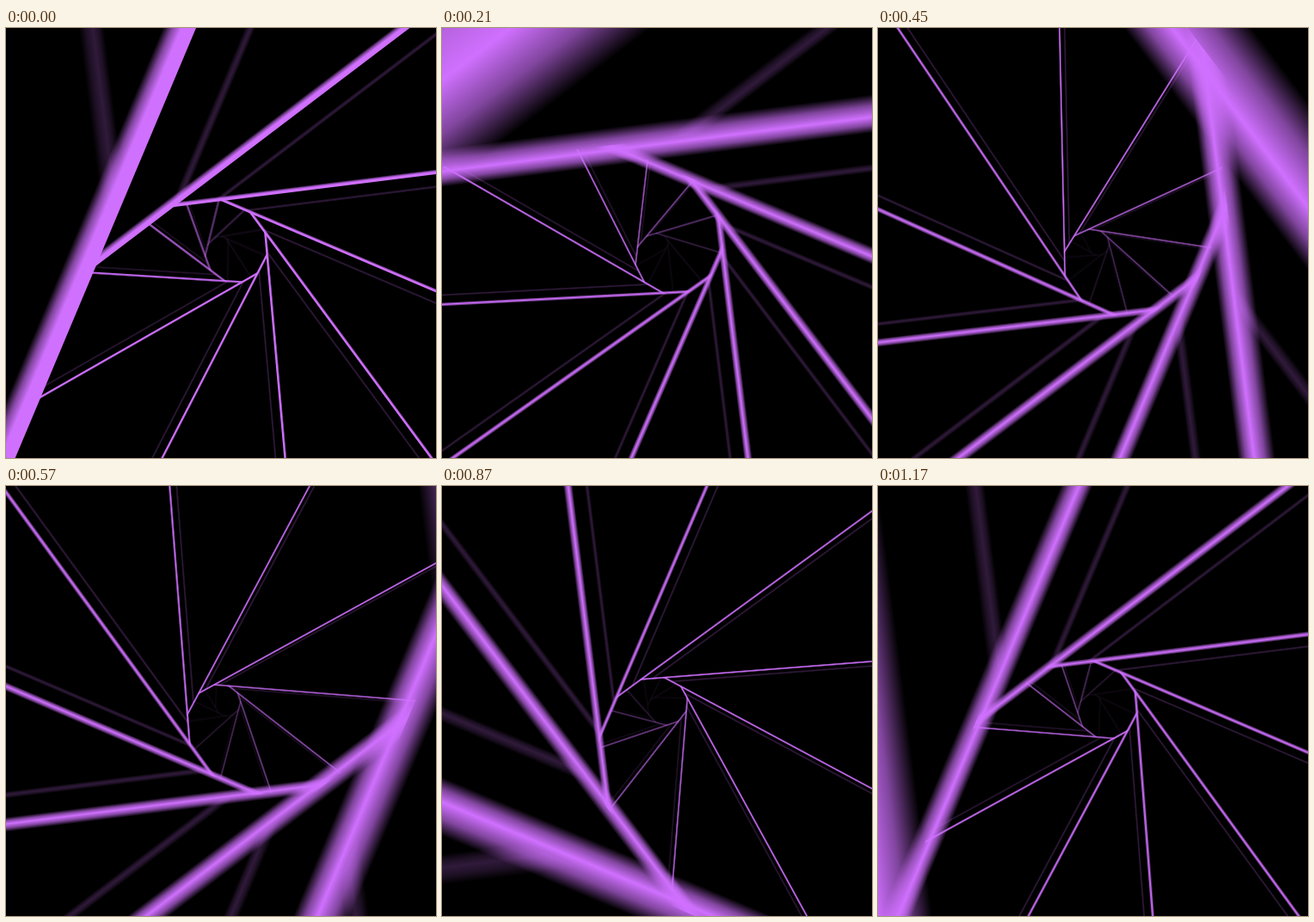
Animation of 500x500 px, one loop 1200 ms. Source, as an HTML page with a canvas:

```html
<!DOCTYPE html>
<html lang="en">
<head>
<meta charset="utf-8">
<title>Spiral tunnel</title>
<style>
  html, body { margin: 0; width: 100%; height: 100%; overflow: hidden; background: #000; }
  canvas { display: block; width: 500px; height: 500px; }
</style>
</head>
<body>
<canvas id="stage" width="500" height="500"></canvas>
<script>
const ctx = document.getElementById('stage').getContext('2d');
const LOOP = 1200, TICK = 30, TURN = 12;
const RAD = Math.PI / 180;
const NEAR = 1.65;      // distance of the camera from the slab at phase 0
const FAR = 17;         // slabs drawn ahead of the camera
const FRONT = 0.23;     // depth of an edge towards the camera
const TRAIL = 0.38;     // depth of an edge away from it, smeared by motion
const SHARP = 0.18;     // the same before any smear
const REACH = 1000;

// Extra rotation of distant slabs, in degrees
const twist = u => 2.72 * Math.log(1 + Math.exp((u - 4.85) / 0.8));

// The camera flies off axis, so each wall has its own distance
function wall(k, u) {
  const turn = twist(u);
  const side = k + turn / 30;
  const shrink = 1 - 0.068 * Math.max(0, u - 7.5);
  return {
    angle: (67.2 - 30 * k - turn) * RAD,
    radius: (316 + 134 * Math.cos((side - 7.6) * 30 * RAD)) * shrink
  };
}

function face(angle) {
  ctx.setTransform(1, 0, 0, 1, 250, 250);
  ctx.rotate(-angle);
}

function strip(radius, z, alpha, crisp) {
  const back = crisp ? SHARP : TRAIL;
  const mid = radius / (z + (back - FRONT) / 2);
  const inner = Math.min(radius / (z + back), mid - 1.5);
  const outer = Math.max(radius / (z - FRONT), mid + 1.5);
  const core = (mid - inner) / (outer - inner);
  const glow = ctx.createLinearGradient(0, -inner, 0, -outer);
  const stop = (at, a) => glow.addColorStop(at, `rgba(208,112,255,${a * alpha})`);
  stop(0, crisp ? 1 : 0);
  stop(core * 0.5, crisp ? 1 : 0.62);
  stop(core, 1);
  stop((1 + core) / 2, 0.62);
  stop(1, 0);
  ctx.fillStyle = glow;
  ctx.fillRect(-REACH, -outer, 2 * REACH, outer - inner);
}

function slab(k, phase, crisp) {
  const u = k - phase, z = u + NEAR;
  const { angle, radius } = wall(k, u);
  const fade = Math.min(1, Math.max(0.06, (13.4 - u) / 6));
  const edge = radius / z;

  ctx.save();
  face(angle);
  ctx.beginPath();
  ctx.rect(-REACH, -edge - 2 * REACH, 2 * REACH, 2 * REACH);
  ctx.clip();
  ctx.fillStyle = '#000';
  ctx.fillRect(-REACH, -edge - 2 * REACH, 2 * REACH, 2 * REACH);

  // Back edge of the slab in front, seen against this one
  const back = wall(k - 1, u - 1);
  face(back.angle);
  strip(back.radius, z + 0.75, 0.23 * fade, false);
  ctx.restore();

  face(angle);
  strip(radius, z, fade, crisp);
}

function draw(now) {
  const tick = Math.floor((now % LOOP) / TICK);
  const phase = tick * TICK / LOOP * TURN;
  ctx.setTransform(1, 0, 0, 1, 0, 0);
  ctx.fillStyle = '#000';
  ctx.fillRect(0, 0, 500, 500);
  const first = Math.ceil(phase - NEAR + 0.32);
  for (let k = first + FAR; k >= first; k--) slab(k, phase, tick === 0);
}

const start = performance.now();
function loop() {
  draw(performance.now() - start);
  requestAnimationFrame(loop);
}
loop();
</script>
</body>
</html>
```
